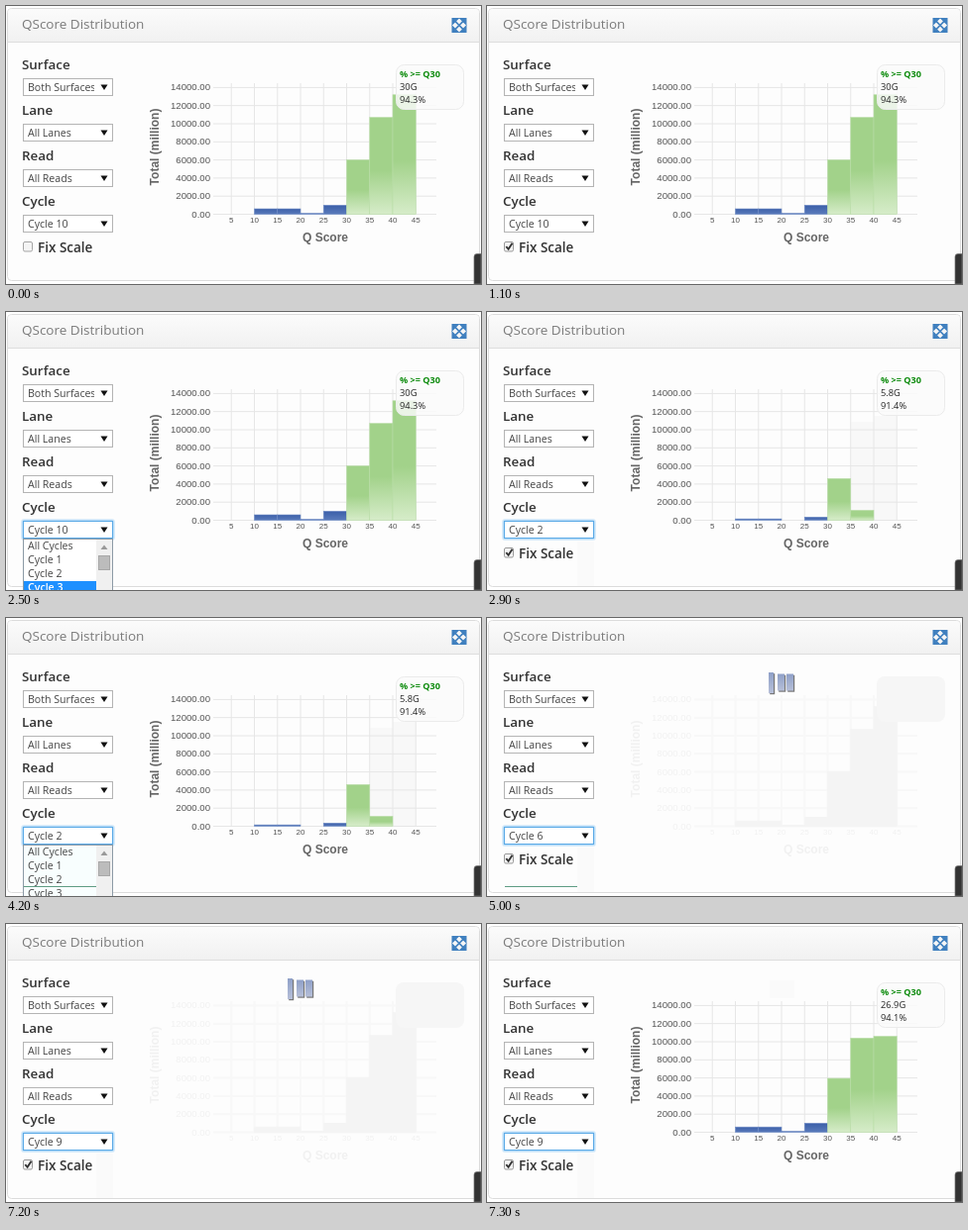
Animation of 479 by 281 pixels, one loop 8.4 s. Source, as an HTML page:

```html
<!DOCTYPE html>
<html lang="en">
<head>
<meta charset="utf-8">
<title>QScore Distribution</title>
<style>
  html, body { margin: 0; width: 100%; height: 100%; overflow: hidden; background: #fff; }
  svg { display: block; width: 100vw; height: 100vh; font-family: "Open Sans", "Noto Sans", sans-serif; }
  .axis { font-family: "Liberation Sans", Arial, sans-serif; }
</style>
</head>
<body>
<svg id="stage" viewBox="0 0 479 281" xmlns="http://www.w3.org/2000/svg">
  <defs>
    <linearGradient id="head" x2="0" y2="1">
      <stop stop-color="#fbfbfb"/><stop offset="1" stop-color="#f1f1f1"/>
    </linearGradient>
    <linearGradient id="green" x2="0" y2="1">
      <stop offset=".55" stop-color="#a2d28a"/><stop offset="1" stop-color="#d6ecc9"/>
    </linearGradient>
    <linearGradient id="blue" x2="0" y2="1">
      <stop stop-color="#3a5ea8"/><stop offset="1" stop-color="#5c7cbc"/>
    </linearGradient>
    <linearGradient id="loadbar" x2="0" y2="1">
      <stop stop-color="#8fa0c8"/><stop offset="1" stop-color="#b6bfd8"/>
    </linearGradient>
    <clipPath id="field"><rect x="18" y="70" width="71" height="160"/></clipPath>
  </defs>
  <g id="panel"></g>
  <g id="chart"></g>
  <g id="form"></g>
  <path d="M479 250.5H475Q472 250.5 472 253.5V281H479Z" fill="#333" stroke="#777" stroke-width=".7"/>
</svg>
<script>
const LOOP = 8400;
const $ = id => document.getElementById(id);

// Each track lists [start ms, value]; a value holds until the next start.
const tracks = {
  box: [[0, "idle"], [300, "hover"], [500, "press"], [1100, "checked"]],
  open: [[0, 0], [1600, 1], [2900, 0], [3800, 1], [5000, 0], [6100, 1], [7200, 0]],
  focus: [[0, 0], [1600, 1]],
  hot: [[0, -1], [2000, 0], [2100, 1], [2400, 2], [2500, 3], [2600, 2], [2900, -1],
        [3800, 2], [4100, 3], [4200, -1], [6300, 2], [6400, -1]],
  line: [[0, 0], [4200, 1], [7200, 0]],
  cycle: [[0, 10], [2900, 2], [5000, 6], [7200, 9]],
  loading: [[0, 0], [5000, 1], [5100, 0], [7200, 1], [7300, 0]],
  trace: [[0, 0], [2900, 1], [5100, 2]],
};

// Counts in millions for the bins starting at 10, 15, ... 40.
const runs = {
  10: { bins: [600, 600, 100, 1000, 6000, 10700, 13200], total: "30G", share: "94.3%" },
  2: { bins: [150, 150, 0, 350, 4600, 1100, 0], total: "5.8G", share: "91.4%" },
  6: { bins: [480, 480, 60, 850, 5600, 9600, 2550], total: "17.7G", share: "92.9%" },
  9: { bins: [580, 580, 100, 1000, 5950, 10400, 10600], total: "26.9G", share: "94.1%" },
};

const valueAt = (track, t) => track.reduce((v, [start, next]) => t >= start ? next : v, track[0][1]);
const xAt = score => 204 + score * 4.65;
const yAt = count => 210.5 - count * 18.3 / 2000;

const rect = (x, y, w, h, fill, extra = "") =>
  `<rect x="${x}" y="${y}" width="${w}" height="${h}" fill="${fill}" ${extra}/>`;
const text = (x, y, size, fill, str, extra = "") =>
  `<text x="${x}" y="${y}" font-size="${size}" fill="${fill}" ${extra}>${str}</text>`;
const path = (d, fill, extra = "") => `<path d="${d}" fill="${fill}" ${extra}/>`;

function expandIcon() {
  const arm = "M0 0L4 4M7 1.6V7H1.6Z";
  return [0, 90, 180, 270].map(a =>
    `<g transform="translate(457 19.5) rotate(${a})">` +
    path(arm, "#4080bf", 'stroke="#4080bf" stroke-width="1.8" transform="scale(.95)"') + "</g>").join("");
}

function panel() {
  return rect(1.5, 2.5, 476, 275, "#fdfdfd", 'rx="4" stroke="#dcdcdc"') +
    path("M2 36V6.5Q2 3 5.5 3H473.5Q477 3 477 6.5V36Z", "url(#head)") +
    path("M2 36.5H477", "none", 'stroke="#dedede"') +
    text(16, 23.3, 13.5, "#7b7b7b", "QScore Distribution") + expandIcon();
}

function axes(ghost) {
  const ink = ghost ? "#f1f1f1" : "#555";
  const bold = 'font-weight="700" text-anchor="middle"';
  let grid = "", labels = "";
  for (let n = 0; n <= 14000; n += 2000) {
    grid += `M209 ${yAt(n)}H434`;
    labels += text(206, yAt(n) + 3, 9.6, ink, n.toFixed(2), 'text-anchor="end"');
  }
  for (let s = 5; s <= 45; s += 5) {
    grid += `M${xAt(s)} 78V211`;
    labels += text(xAt(s), 219, 8, ink, s, 'text-anchor="middle"');
  }
  return path(grid, "none", `stroke="${ghost ? "#f8f8f8" : "#e6e6e6"}" stroke-width="${ghost ? 2 : 1}"`) +
    `<g class="axis">${labels}` +
    text(322, 238.3, 12, ghost ? ink : "#666", "Q Score", bold) +
    text(0, 0, 12, ghost ? ink : "#666", "Total (million)", bold + ' transform="translate(153.5 142.5) rotate(-90)"') +
    "</g>";
}

function bars(bins, ghost) {
  return bins.map((n, i) => {
    if (!n) return "";
    const fill = ghost ? "#f4f4f4" : i < 4 ? "url(#blue)" : "url(#green)";
    const edge = ghost ? "#f4f4f4" : i < 4 ? "#6f8cc6" : "#b9dda7";
    return rect(xAt(10 + i * 5), yAt(n), 23.25, 210.5 - yAt(n), fill, `stroke="${edge}" stroke-width=".6"`);
  }).join("");
}

function tooltip(run) {
  return rect(393.5, 59.5, 68, 45, "#fcfcfc", 'rx="8" fill-opacity=".82" stroke="#ebebeb"') +
    text(397, 72.3, 9.1, "#0a8a0a", "% &gt;= Q30", 'font-weight="700"') +
    text(397, 85.3, 9.3, "#222", run.total) +
    text(397, 98.3, 9.3, "#222", run.share);
}

function loader() {
  return [[284, 55, 5, 21], [293, 56.5, 7, 17], [302, 56.5, 7, 17]].map(([x, y, w, h]) =>
    rect(x + 1.2, y + 1.2, w, h, "#777") + rect(x, y, w, h, "url(#loadbar)")).join("");
}

function chart(s) {
  if (s.loading) {
    return axes(true) + bars(runs[10].bins, true) +
      rect(393, 59, 69, 46, "#f6f6f6", 'rx="8"') + loader();
  }
  const run = runs[s.cycle];
  let faint = "";
  if (s.cycle === 2) faint = path("M366.5 111H390V105H413V210H366.5Z", "#f8f8f8");
  if (s.cycle === 6) faint = rect(390, 105, 23, 105, "#f8f8f8");
  if (s.trace === 2) faint += rect(285, 57, 25, 18, "#fafafa");
  return faint + axes(false) + bars(run.bins, false) + tooltip(run);
}

function select(y, label, value, focus) {
  const glow = focus ? [4, 2].map(w =>
    rect(17.5, y + .5, 90, 17, "none", `stroke="#66b4ee" stroke-opacity=".25" stroke-width="${w + 1}" rx="1"`)).join("") : "";
  return text(16, y - 9.2, 13.4, "#333", label, 'font-weight="600"') + glow +
    rect(17.5, y + .5, 90, 17, "#fff", `stroke="${focus ? "#5aa9e6" : "#b4b4b4"}"`) +
    text(22, y + 12.9, 10.6, "#444", value, 'clip-path="url(#field)"') +
    path(`M95.5 ${y + 6.5}h7l-3.5 5.5Z`, "#111");
}

function checkbox(state) {
  const looks = { idle: ["#f4f4f4", "#a5a5a5"], hover: ["#fafafa", "#777"], press: ["#dcdcdc", "#777"], checked: ["#f4f4f4", "#999"] };
  const [fill, edge] = looks[state];
  return rect(17.5, 238.5, 9, 9.5, fill, `stroke="${edge}" rx="1.5"`) +
    (state === "checked" ? path("M19.3 243.2L21.6 245.8L25.5 239.8", "none", 'stroke="#333" stroke-width="1.9"') : "") +
    text(32, 249.2, 13.5, "#333", "Fix Scale", 'font-weight="600"');
}

function list(s) {
  const rows = ["All Cycles", "Cycle 1", "Cycle 2", "Cycle 3"].map((name, i) => {
    const y = 230 + i * 14, hot = s.hot === i;
    return (hot ? rect(18, y, 73, 14, "#1e90ff") : "") +
      text(22, y + 10.3, 10.6, hot ? "#fff" : "#444", name, hot ? 'font-weight="600"' : "");
  }).join("");
  return rect(17.5, 229.5, 90, 60, s.trace ? "#f8fefe" : "#fff", 'stroke="#8c9aa6"') + rows +
    rect(91, 230, 16, 51, "#f0f0f0") +
    path("M95.5 240h7l-3.5-4.5Z", "#999") +
    rect(93.5, 246.5, 11, 14, "#bcbcbc", 'stroke="#a8a8a8"');
}

function form(s) {
  const fields = select(73, "Surface", "Both Surfaces") + select(119, "Lane", "All Lanes") +
    select(165, "Read", "All Reads") + select(211, "Cycle", "Cycle " + s.cycle, s.focus);
  const faint = s.trace && !s.open ? rect(91, 232, 17, 45, "#fafafa") : "";
  return faint + fields + (s.open ? list(s) : checkbox(s.box)) +
    (s.line ? rect(18, 271, 73, 1, "#5f9c84") : "");
}

let last = "";
function render(t) {
  const s = {};
  for (const key in tracks) s[key] = valueAt(tracks[key], t);
  const stamp = JSON.stringify(s);
  if (stamp === last) return;
  last = stamp;
  $("chart").innerHTML = chart(s);
  $("form").innerHTML = form(s);
}

$("panel").innerHTML = panel();
const begin = performance.now();
function tick() {
  render((performance.now() - begin) % LOOP);
  requestAnimationFrame(tick);
}
tick();
</script>
</body>
</html>
```
